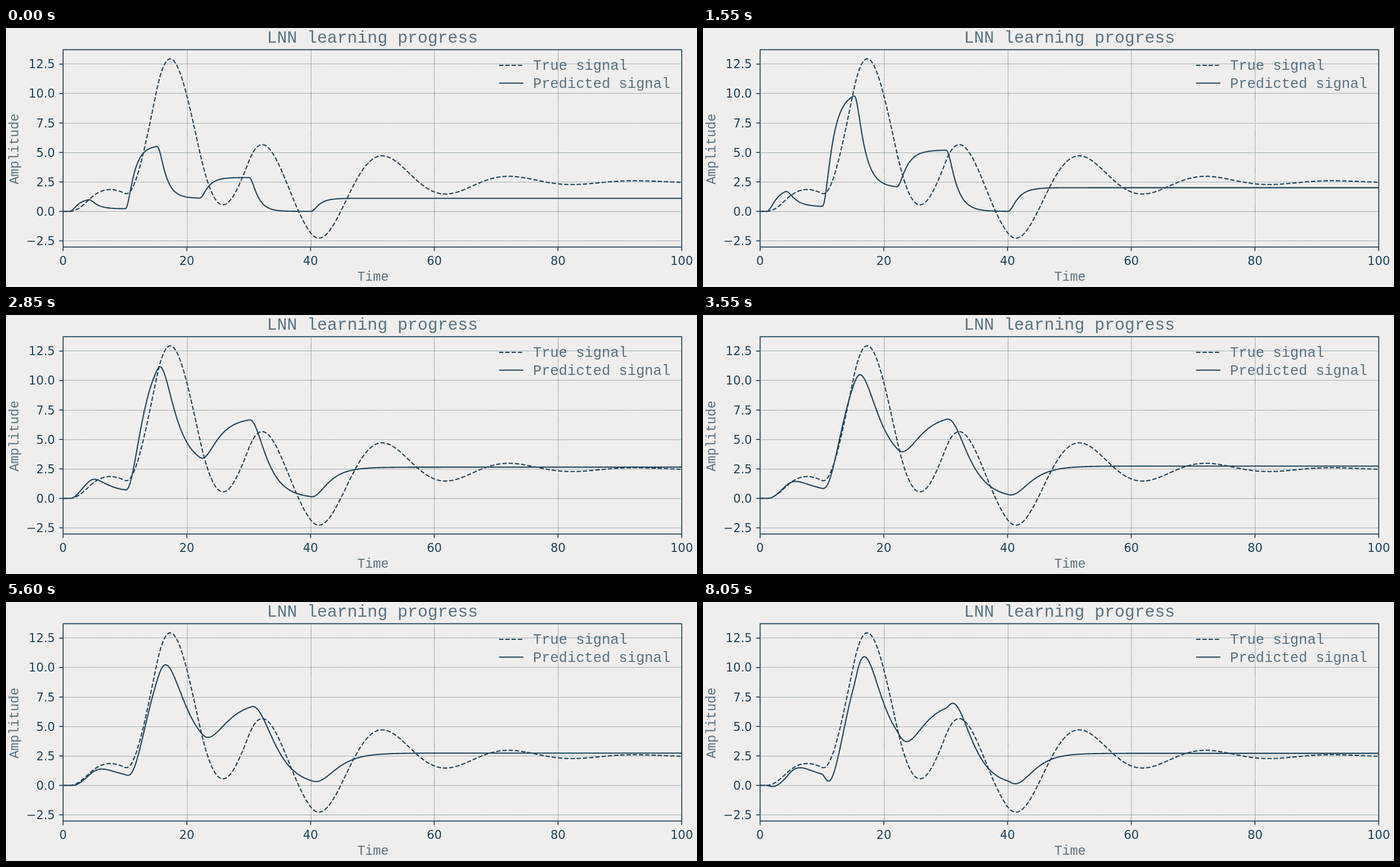
Animation of 1222 by 458 pixels, one loop 8.1 s. Source, as an HTML page with a canvas:

```html
<!DOCTYPE html>
<html lang="en">
<head>
<meta charset="utf-8">
<title>LNN learning progress</title>
<style>
html, body { margin: 0; width: 100%; height: 100%; overflow: hidden; background: #f0eeec; }
canvas { display: block; width: 1222px; height: 458px; }
</style>
</head>
<body>
<canvas id="chart" width="1222" height="458"></canvas>
<script>
const ctx = document.getElementById('chart').getContext('2d');
const INK = '#1b435d', PAPER = '#f0eeec';
const LEFT = 101, RIGHT = 1195, TOP = 38.4, BOTTOM = 387.4;
const LOOP = 8100, TICK = 50;
const MONO = '"Liberation Mono", monospace', SANS = '"DejaVu Sans", sans-serif';

// Line weights in points at 150 dpi.
const PT = 150 / 72;
const THIN = 0.5 * PT, FRAME = 0.8 * PT, BOLD = PT;
const DASH = [3.7 * BOLD, 1.6 * BOLD], DOTS = [THIN, 1.65 * THIN];

const px = t => LEFT + (RIGHT - LEFT) * t / 100;
const py = v => 324.3 - 20.84 * v;

// The input is a staircase: switch times and the level after each one.
const TIMES = [1, 4, 10, 15.12, 22, 30, 40];
const LEVELS = [1, 0.2, 5.05, 1, 2.59, 0, 1];

// Training state: time, gain, slow lag, fast lag, undershoot.
const STAGES = [
  [0, 1.11, 1.15, 0.25, 0],
  [900, 1.74, 1.2, 0.25, 0],
  [2200, 2.28, 1.55, 0.3, 0],
  [2550, 2.48, 1.75, 0.4, 0],
  [2850, 2.65, 2.25, 0.65, 0],
  [3400, 2.74, 2.5, 0.95, 0],
  [4500, 2.74, 2.5, 1.15, 0],
  [6650, 2.74, 2.35, 1.15, 0.4],
  [8050, 2.72, 2.2, 1.1, 0.8]
];

function stageAt(ms) {
  let i = 0;
  while (i < STAGES.length - 2 && ms > STAGES[i + 1][0]) i++;
  const a = STAGES[i], b = STAGES[i + 1];
  const k = Math.min(1, (ms - a[0]) / (b[0] - a[0]));
  return a.map((v, j) => v + (b[j] - v) * k).slice(1);
}

// Step response of a damped oscillator.
function oscillator(t) {
  const damp = 0.075, freq = Math.sqrt(0.1 - damp * damp);
  return 2.5 * (1 - Math.exp(-damp * t) *
    (Math.cos(freq * t) + damp / freq * Math.sin(freq * t)));
}

// Step response of one slow lag, two equal fast lags and a right-hand zero.
function lagResponse([gain, slow, fast, under]) {
  const a = (slow / (slow - fast)) ** 2;
  const b = 1 - a;
  const c = a / slow + b / fast;
  return t => {
    const e1 = Math.exp(-t / slow), e2 = Math.exp(-t / fast);
    const rest = a * e1 + (b + c * t) * e2;
    const slope = -a / slow * e1 + (c - (b + c * t) / fast) * e2;
    return gain * (1 - rest + under * slope);
  };
}

function curve(response) {
  const path = new Path2D();
  for (let i = 0; i <= 1000; i++) {
    const t = i / 10;
    let v = 0;
    TIMES.forEach((start, j) => {
      if (t > start) v += (LEVELS[j] - (LEVELS[j - 1] || 0)) * response(t - start);
    });
    path.lineTo(px(t), py(v));
  }
  return path;
}

function line(x1, y1, x2, y2, width, dash = []) {
  ctx.lineWidth = width;
  ctx.setLineDash(dash);
  ctx.beginPath();
  ctx.moveTo(x1, y1);
  ctx.lineTo(x2, y2);
  ctx.stroke();
}

function text(str, x, y, size, family, align = 'center') {
  ctx.font = size + 'px ' + family;
  ctx.textAlign = align;
  ctx.fillText(str, x, y);
}

function drawAxes() {
  for (let t = 0; t <= 100; t += 20) {
    const x = px(t), snapped = Math.round(x) + 0.5;
    if (t > 0 && t < 100) line(snapped, BOTTOM, snapped, TOP, THIN, DOTS);
    line(x, BOTTOM, x, BOTTOM + 7, FRAME);
    text(t, x, 419, 10 * PT, SANS);
  }
  for (let v = -2.5; v <= 12.5; v += 2.5) {
    const y = py(v), snapped = Math.floor(y) + 0.5;
    line(LEFT, snapped, RIGHT, snapped, THIN, DOTS);
    line(LEFT - 7, y, LEFT, y, FRAME);
    text(v.toFixed(1).replace('-', '\u2212'), 86.5, Math.round(y + 7.5), 10 * PT, SANS, 'right');
  }
}

function drawLabels() {
  ctx.globalAlpha = 0.72;
  text('LNN learning progress', 648, 26, 29.6, MONO);
  text('Time', 649, 447, 23.2, MONO);
  text('True signal', 932, 74, 25.3, MONO, 'left');
  text('Predicted signal', 932, 105.5, 25.3, MONO, 'left');
  ctx.save();
  ctx.translate(21.5, 214);
  ctx.rotate(-Math.PI / 2);
  text('Amplitude', 0, 0, 23.2, MONO);
  ctx.restore();
  ctx.globalAlpha = 1;
}

const truth = curve(oscillator);

function draw(ms) {
  ctx.fillStyle = PAPER;
  ctx.fillRect(0, 0, 1222, 458);
  ctx.fillStyle = ctx.strokeStyle = INK;
  ctx.lineJoin = 'round';
  drawAxes();

  ctx.lineWidth = BOLD;
  ctx.setLineDash(DASH);
  ctx.stroke(truth);
  ctx.setLineDash([]);
  ctx.stroke(curve(lagResponse(stageAt(ms))));

  ctx.lineWidth = FRAME;
  ctx.strokeRect(LEFT, TOP, RIGHT - LEFT, BOTTOM - TOP);
  line(872, 66, 915, 66, BOLD, DASH);
  line(872, 97.5, 915, 97.5, BOLD);
  drawLabels();
}

function frame() {
  const ms = performance.now() % LOOP;
  draw(Math.floor(ms / TICK) * TICK);
  requestAnimationFrame(frame);
}
frame();
</script>
</body>
</html>
```
